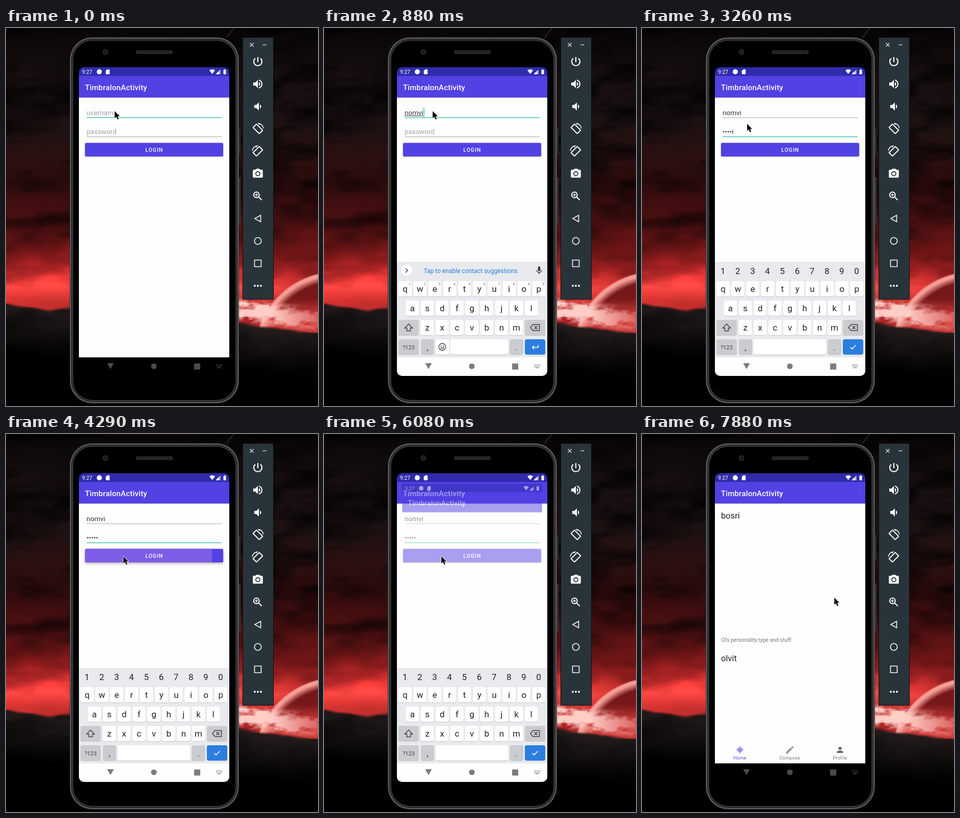
Recreate the animation shown at these times as an HTML page with a canvas. Size 612 px wide and 742 px high, loop 8 s.

```html
<!DOCTYPE html>
<html lang="en">
<head>
<meta charset="utf-8">
<title>Login flow</title>
<style>
html, body { margin: 0; width: 100%; height: 100%; overflow: hidden; background: #000; }
canvas { display: block; }
</style>
</head>
<body>
<canvas id="stage" width="612" height="742"></canvas>
<script>
const W = 612, H = 742, LOOP = 8000;
const PURPLE = '#5241e3', TEAL = '#3fc6b2';
const USER = 'nomvi', TITLE = 'TimbralonActivity';
const stage = document.getElementById('stage').getContext('2d');
let c = stage;

// ---------- drawing helpers ----------
function layer(draw) {
  const canvas = document.createElement('canvas');
  canvas.width = W;
  canvas.height = H;
  const prev = c;
  c = canvas.getContext('2d');
  draw();
  c = prev;
  return canvas;
}
function box(x, y, w, h, color, r = 0) {
  c.fillStyle = color;
  c.beginPath();
  c.roundRect(x, y, w, h, r);
  c.fill();
}
function dot(x, y, r, color) {
  c.fillStyle = color;
  c.beginPath();
  c.arc(x, y, r, 0, 7);
  c.fill();
}
function ring(x, y, r, color, width = 1.6) {
  c.strokeStyle = color;
  c.lineWidth = width;
  c.beginPath();
  c.arc(x, y, r, 0, 7);
  c.stroke();
}
function text(str, x, y, size, color, { weight = 400, align = 'left', gap = 0 } = {}) {
  c.font = `${weight} ${size}px Roboto, sans-serif`;
  c.letterSpacing = gap + 'px';
  c.textAlign = align;
  c.fillStyle = color;
  c.fillText(str, x, y);
}
function line(d, color, width = 1.6, x = 0, y = 0) {
  c.save();
  c.translate(x, y);
  c.strokeStyle = color;
  c.lineWidth = width;
  c.stroke(new Path2D(d));
  c.restore();
}
// Filled path on a 24-unit grid, centred on x, y
function icon(d, x, y, scale, color, flip = 1) {
  c.save();
  c.translate(x, y);
  c.scale(scale * flip, scale);
  c.translate(-12, -12);
  c.fillStyle = color;
  c.fill(new Path2D(d), 'evenodd');
  c.restore();
}

const ICON = {
  loud: 'M3 9v6h4l5 5V4L7 9H3zm13.5 3c0-1.77-1.02-3.29-2.5-4.03v8.05c1.48-.73 2.5-2.25 2.5-4.02zM14 3.23v2.06c2.89.86 5 3.54 5 6.71s-2.11 5.85-5 6.71v2.06c4.01-.91 7-4.49 7-8.77s-2.99-7.86-7-8.77z',
  quiet: 'M18.5 12c0-1.77-1.02-3.29-2.5-4.03v8.05c1.48-.73 2.5-2.25 2.5-4.02zM5 9v6h4l5 5V4L9 9H5z',
  rotate: 'M16.48 2.52c3.27 1.55 5.61 4.72 5.97 8.48h1.5C23.44 4.84 18.29 0 12 0l-.66.03 3.81 3.81 1.33-1.32zM10.23 1.75c-.59-.59-1.54-.59-2.12 0L1.75 8.11c-.59.59-.59 1.54 0 2.12l12.02 12.02c.59.59 1.54.59 2.12 0l6.36-6.36c.59-.59.59-1.54 0-2.12L10.23 1.75zm4.6 18.6L3.65 9.17l5.52-5.52 11.18 11.18-5.52 5.52z',
  camera: 'M9 2L7.17 4H4c-1.1 0-2 .9-2 2v12c0 1.1.9 2 2 2h16c1.1 0 2-.9 2-2V6c0-1.1-.9-2-2-2h-3.17L15 2H9zm3 15a5 5 0 1 1 0-10 5 5 0 0 1 0 10z',
  zoom: 'M15.5 14h-.79l-.28-.27A6.47 6.47 0 0 0 16 9.5 6.5 6.5 0 1 0 9.5 16c1.61 0 3.09-.59 4.23-1.57l.27.28v.79l5 4.99L20.49 19l-4.99-5zm-6 0C7.01 14 5 11.99 5 9.5S7.01 5 9.5 5 14 7.01 14 9.5 11.99 14 9.5 14z',
  person: 'M12 12a4 4 0 1 0 0-8 4 4 0 0 0 0 8zm0 2c-2.67 0-8 1.34-8 4v2h16v-2c0-2.66-5.33-4-8-4z',
  pencil: 'M3 17.25V21h3.75L17.81 9.94l-3.75-3.75L3 17.25zM20.71 7.04a1 1 0 0 0 0-1.41l-2.34-2.34a1 1 0 0 0-1.41 0l-1.83 1.83 3.75 3.75 1.83-1.83z',
  mic: 'M12 14c1.66 0 3-1.34 3-3V5c0-1.66-1.34-3-3-3S9 3.34 9 5v6c0 1.66 1.34 3 3 3zm5.3-3c0 3-2.54 5.1-5.3 5.1S6.7 14 6.7 11H5c0 3.41 2.72 6.23 6 6.72V21h2v-3.28c3.28-.48 6-3.3 6-6.72h-1.7z'
};

// ---------- wallpaper ----------
const mix = (a, b, k) => a + (b - a) * k;
const blend = (a, b, k) => a.map((v, i) => mix(v, b[i], k));
const clamp = v => Math.min(1, Math.max(0, v));
function hash(x, y) {
  let h = Math.imul(x, 374761393) + Math.imul(y, 668265263);
  h = Math.imul(h ^ (h >>> 13), 1274126177);
  return ((h ^ (h >>> 16)) >>> 0) / 4294967296;
}
function noise(x, y) {
  const i = Math.floor(x), j = Math.floor(y);
  const u = (x - i) ** 2 * (3 - 2 * (x - i)), v = (y - j) ** 2 * (3 - 2 * (y - j));
  return mix(mix(hash(i, j), hash(i + 1, j), u), mix(hash(i, j + 1), hash(i + 1, j + 1), u), v);
}
function fbm(x, y) {
  let sum = 0;
  for (let o = 0, a = 0.53; o < 4; o++, a /= 2) sum += a * noise(x * 2 ** o, y * 2 ** o + o * 31);
  return sum;
}
// y, red, green and blue
const SKY = [
  [0, 8, 5, 6], [110, 24, 15, 16], [200, 30, 17, 17], [260, 44, 16, 17], [300, 42, 11, 12],
  [350, 60, 13, 15], [400, 80, 16, 17], [440, 115, 22, 23], [470, 165, 34, 35],
  [498, 218, 54, 52], [515, 232, 66, 62], [535, 205, 50, 48], [580, 165, 34, 34]
];
function sky(y) {
  let i = 1;
  while (i < SKY.length - 1 && SKY[i][0] < y) i++;
  const a = SKY[i - 1], b = SKY[i];
  return blend(a, b, clamp((y - a[0]) / (b[0] - a[0]))).slice(1);
}
function planet(col, x, y) {
  const d = Math.hypot(x - 650, y - 641) - 161.5;
  if (d < 0) {
    const low = clamp((y - 530) / 35);
    col = blend([118, 24, 26], [205, 58, 55], low);
  }
  const rim = d > 0 ? clamp(1 - d / 3) : clamp(1.35 + d / 13);
  col = blend(col, [246, 158, 150], rim);
  const band = clamp(1 - Math.abs(y - 553 - (x - 457) * 0.12) / 26);
  const puff = clamp((fbm(x / 20, y / 10) - 0.42 + band * 0.35) * 3) * clamp(band * 2.5);
  return blend(col, [255, 205, 198], puff * clamp((650 - x) / 130));
}
function wallpaperColor(x, y) {
  const n = fbm(x / 85, (y + x * 0.08) / 32), right = x > 300;
  const calm = clamp((y - 310) / 130);
  const shade = mix(clamp((n - 0.12) * 2.2), 0.75 + n * 0.5, calm);
  let col = sky(y + (n - 0.5) * 34).map(v => v * shade);
  if (right) col = planet(col, x, y);
  const edge = right ? 574 + (x - 457) * 0.12 : 537 + Math.min(x, 75) * 0.16;
  const depth = y - edge - (n - 0.5) * 14;
  const fade = clamp(1 - depth / 100) * (0.5 + n);
  return blend(col, [31, 24, 24].map(v => v * fade), clamp(depth / 6));
}
function wallpaper() {
  const img = c.createImageData(W, H);
  for (let y = 0; y < H; y++) {
    for (let x = 0; x < W; x++) {
      if (x > 145 && x < 440 && y > 20 && y < 730) continue;
      img.data.set([...wallpaperColor(x, y), 255], (y * W + x) * 4);
    }
  }
  c.putImageData(img, 0, 0);
  line('M447 0L432 19', 'rgba(120,120,120,.3)', 2);
}

// ---------- fixed scenery ----------
function phone() {
  box(456, 198, 4, 49, '#2c2c2e', 1);
  box(456, 293, 4, 94, '#353537', 1);
  const rims = ['#2f3032', '#6c6e70', '#4b4c4e', '#2b2c2d', '#1c1c1d', '#48494b', '#2a2b2d', '#000'];
  rims.forEach((color, i) => box(125 + i, 18 + i, 332 - 2 * i, 719 - 2 * i, color, 44 - i));
  dot(195, 47, 5.5, '#26272b');
  dot(195, 47, 3, '#15161c');
  box(255, 44, 72, 7, '#2b2b2b', 3);
  box(258, 46, 66, 3, '#202020', 1);
}

function toolbar() {
  box(464, 19, 61, 514, '#0a0d0f');
  box(465, 19, 59, 513, '#29343a');
  line('M-3.5 -3.5L3.5 3.5M3.5 -3.5L-3.5 3.5', '#e4e7e8', 1.3, 482, 33);
  line('M-3.5 0H3.5', '#e4e7e8', 1.3, 507, 33);
  line('M0 -9V1M-5 -6.3A8 8 0 1 0 5 -6.3', '#fff', 2.2, 494, 66);
  icon(ICON.loud, 494, 110, 1, '#fff');
  icon(ICON.quiet, 494, 154, 1, '#fff');
  icon(ICON.rotate, 494, 198, 0.96, '#fff');
  icon(ICON.rotate, 494, 242, 0.96, '#fff', -1);
  icon(ICON.camera, 494, 286, 0.98, '#fff');
  dot(494, 286, 3.1, '#fff');
  icon(ICON.zoom, 493.8, 330, 1, '#fff');
  line('M-2.5 -3V3M-5.5 0H.5', '#fff', 1.4, 493.8, 327.5);
  line('M-6 0L5.5 -6.5V6.5Z', '#fff', 1.6, 494, 374);
  ring(494, 418, 6.7, '#fff');
  line('M-6.5 -6.5H6.5V6.5H-6.5Z', '#fff', 1.6, 494, 462);
  for (const dx of [-6, 0, 6]) dot(494 + dx, 506, 1.9, '#fff');
}

// ---------- phone screens ----------
function navBar(back, front) {
  box(143, 646.4, 295, 37, back);
  icon('M4 4H20L12 18Z', 205, 664.5, 0.82, front);
  dot(290, 664, 5.6, front);
  box(369, 658.5, 12, 12, front, 1);
  for (let i = 0; i < 10; i++) box(412 + (i % 5) * 2.6, 660.5 + (i > 4) * 2.5, 1.5, 1.5, front);
  box(414.5, 666, 7, 1.5, front);
}

function appFrame() {
  box(143, 77, 295, 606, '#fefefe');
  box(143, 77, 295, 18, '#2e2cab');
  box(143, 94, 295, 42.5, PURPLE);
  box(143, 136.5, 295, 1, 'rgba(0,0,0,.13)');
  text('9:27', 149, 90, 10.5, '#fff');
  dot(183, 86, 5, '#fff');
  icon('M18 2H10L4 8V20Q4 22 6 22H18Q20 22 20 20V4Q20 2 18 2Z', 199.5, 86, 0.47, '#fff');
  icon('M12 21L0 6C7 .5 17 .5 24 6Z', 404.5, 86, 0.46, '#fff');
  icon('M2 22H22V2Z', 416, 86, 0.47, 'rgba(255,255,255,.65)');
  icon('M2 22H15V9Z', 416, 86, 0.47, '#fff');
  box(426.5, 82, 5, 9, '#fff', 1);
  box(428, 81, 2, 2, '#fff');
  text(TITLE, 155, 122, 15, '#fff', { weight: 500, gap: 0.19 });
  navBar('#000', '#4b4b4b');
}

function homePage() {
  appFrame();
  dot(192, 620, 4.8, '#8d78ec');
  line('M-7 0H7M0 -7V7', '#8d78ec', 1.4, 192, 620);
  ring(192, 620, 2.7, '#d6cdfa', 0.8);
  icon(ICON.pencil, 290, 620, 0.82, '#9a9a9a');
  icon(ICON.person, 388.5, 620, 0.76, '#5f5f5f');
  const tabs = [['Home', 192, '#5b47e2'], ['Compose', 290, '#777'], ['Profile', 388.5, '#777']];
  for (const [name, x, color] of tabs) text(name, x, 639, 9, color, { align: 'center', gap: 0.3 });
}

function field(value, hint, y, focused) {
  text(value || hint, 158, y, 13.5, value ? '#333' : '#a0a0a0');
  if (focused) box(158, y + 4.8, 265, 1.5, TEAL);
  else box(158, y + 5, 265, 1, '#a5a5a5');
}
function valueWidth(value) {
  c.font = '400 13.5px Roboto, sans-serif';
  c.letterSpacing = '0px';
  return c.measureText(value).width;
}
function caret(value, y) {
  box(158.5 + valueWidth(value), y - 14.5, 1.5, 18.5, TEAL);
}

function loginButton(ripple) {
  c.save();
  c.shadowColor = 'rgba(0,0,0,.35)';
  c.shadowBlur = ripple ? 5 : 2.5;
  c.shadowOffsetY = ripple ? 2 : 1;
  box(155, 225.5, 271, 26.5, PURPLE, 2.5);
  c.restore();
  if (ripple) {
    c.save();
    c.beginPath();
    c.roundRect(155, 225.5, 271, 26.5, 2.5);
    c.clip();
    dot(230, 240, ripple, '#7d5de7');
    c.restore();
  }
  text('LOGIN', 290.8, 243, 10.5, '#fff', { weight: 500, align: 'center', gap: 0.94 });
}

// ---------- keyboard ----------
const PITCH = 29.15;
function key(x, y, w, color = '#fff') {
  box(x, y + 1, w, 30, '#c3c5c9', 4);
  box(x, y, w, 30, color, 4);
}
function keyRow(chars, x, y, marks) {
  [...chars].forEach((ch, i) => {
    const cx = x + i * PITCH;
    key(cx - 13, y, 26);
    text(ch, cx, y + 20.5, 17, '#222', { align: 'center' });
    if (marks) text(String((i + 1) % 10), cx + 9.5, y + 8, 6.5, '#666', { align: 'center' });
  });
}
function keyboard(password, prompt) {
  const gray = '#caccd1', ink = '#3c4043';
  box(143, 459, 295, 190, '#e8eaed');
  if (password) {
    [...'1234567890'].forEach((n, i) => text(n, 158.7 + i * PITCH, 483, 17, '#222', { align: 'center' }));
  } else {
    dot(162, 476.6, 11.6, '#d2d4d7');
    dot(162, 476, 11.4, '#fff');
    line('M-2 -4L2 0L-2 4', ink, 1.5, 162, 476);
    icon(ICON.mic, 422, 476, 0.8, ink);
    if (prompt) text('Tap to enable contact suggestions.', 289, 480.5, 12, '#2b7de0', { align: 'center' });
  }
  keyRow('qwertyuiop', 159, 497, !password);
  keyRow('asdfghjkl', 173.4, 535);
  keyRow('zxcvbnm', 202.6, 573);
  key(146, 573, 40, gray);
  line('M0 -7L7.5 1H3.5V6.5H-3.5V1H-7.5Z', ink, 1.5, 166, 588);
  key(394, 573, 40, gray);
  line('M-9 0L-4 -6H8.5V6H-4ZM-1.5 -3L4.5 3M4.5 -3L-1.5 3', ink, 1.5, 414, 588);
  key(146, 611, 40, gray);
  text('?123', 166, 631, 11, ink, { align: 'center' });
  key(190, 611, 26, gray);
  text(',', 203, 633, 15, '#222', { align: 'center' });
  key(364.5, 611, 26, gray);
  text('.', 377.5, 633, 15, '#222', { align: 'center' });
  key(394, 611, 40, '#2b7de0');
  if (password) {
    key(219, 611, 142);
    line('M-5.5 0L-2 3.5L5.5 -4', '#fff', 1.6, 414, 626.5);
  } else {
    key(219, 611, 26);
    ring(232, 626, 6.8, ink, 1.4);
    dot(229.6, 624.3, 1.1, ink);
    dot(234.4, 624.3, 1.1, ink);
    line('M-3.6 1.5A3.9 3.9 0 0 0 3.6 1.5Z', ink, 1, 232, 626);
    key(248, 611, 113);
    line('M6 -4V1H-5M-1.8 -2.5L-5.3 1L-1.8 4.5', '#fff', 1.6, 414, 626);
  }
  navBar('#fefefe', '#7c7c7c');
}

const scenery = layer(() => { wallpaper(); phone(); toolbar(); });
const frame = layer(appFrame);
const home = layer(homePage);
const boards = {
  full: layer(() => keyboard(false, true)),
  plain: layer(() => keyboard(false, false)),
  password: layer(() => keyboard(true))
};

// ---------- timeline: [start, value...] ----------
const POINTER = [[0, 213, 163], [1030, 212, 169], [1170, 209, 180], [1320, 206, 188], [3850, 219, 216],
  [3990, 230, 240], [6680, 269, 257], [6830, 377, 321]];
const USER_KEYS = [[0, 0], [300, 1], [450, 2], [600, 3], [730, 4], [880, 5]];
const PASS_KEYS = [[0, 0], [2220, 1], [2370, 2], [2510, 3], [2660, 4], [2810, 5]];
const CARET = [[0, 0], [300, 1], [1030, 0], [1470, 1], [3260, 0], [3700, 1], [4290, 0], [4890, 1], [5780, 0]];
const RIPPLE = [[0, 0], [4290, 174], [4440, 260], [4590, 0]];
const BOARD = [[0, 'full'], [1620, 'plain'], [2070, 'password']];
const BOARD_POSE = [[0, 0, 0], [300, 45, 0.7], [450, 0, 1], [6380, 14, 0.9], [6530, 73, 0.38], [6680, 0, 0]];
// opacity and scale of the opening page
const PAGE = [[0, 0, 1], [6080, 0.5, 0.93], [6230, 1, 0.985], [6380, 1, 1]];

function at(track, t) {
  let now = track[0];
  for (const step of track) if (step[0] <= t) now = step;
  return now.slice(1);
}

function login(t) {
  c.drawImage(frame, 0, 0);
  const onUser = t < 1470;
  const user = USER.slice(0, at(USER_KEYS, t)[0]);
  const typed = at(PASS_KEYS, t)[0];
  const pass = t < 3700 && typed ? '•'.repeat(typed - 1) + USER[typed - 1] : '•'.repeat(typed);
  field(user, 'username', 170.5, onUser);
  field(pass, 'password', 208, !onUser);
  if (onUser && user) box(158, 172, valueWidth(user), 1, '#333');
  if (at(CARET, t)[0]) onUser ? caret(user, 170.5) : caret(pass, 208);
  loginButton(at(RIPPLE, t)[0]);
}

function openHome(alpha, scale) {
  c.save();
  c.globalAlpha = alpha;
  c.translate(290.5, 380);
  c.scale(scale, scale);
  c.drawImage(home, -290.5, -380);
  c.restore();
}

function feed() {
  text('bosri', 155, 166, 16.5, '#222');
  text("Ol's personality type and stuff", 155, 407.5, 10.5, '#777');
  text('olvit', 155, 446, 16.5, '#222');
}

function pointer(x, y) {
  c.save();
  c.translate(x + 0.2, y + 0.3);
  c.scale(0.95, 0.95);
  const arrow = new Path2D('M0 0V14.5L3.4 11.4L5.9 17L8.3 16L5.9 10.5H10.5Z');
  c.strokeStyle = '#fff';
  c.lineWidth = 1.8;
  c.lineJoin = 'round';
  c.stroke(arrow);
  c.fillStyle = '#000';
  c.fill(arrow);
  c.restore();
}

function render(t) {
  c.drawImage(scenery, 0, 0);
  c.save();
  c.beginPath();
  c.roundRect(143, 77, 295, 606, 10);
  c.clip();
  const [shown, scale] = at(PAGE, t);
  if (scale < 1 || !shown) login(t);
  if (shown) openHome(shown, scale);
  if (t >= 7880) feed();
  const [drop, alpha] = at(BOARD_POSE, t);
  if (alpha) {
    c.globalAlpha = alpha;
    c.drawImage(boards[at(BOARD, t)[0]], 0, drop);
    c.globalAlpha = 1;
  }
  c.restore();
  pointer(...at(POINTER, t));
}

function tick() {
  render(performance.now() % LOOP);
  requestAnimationFrame(tick);
}
tick();
</script>
</body>
</html>
```
